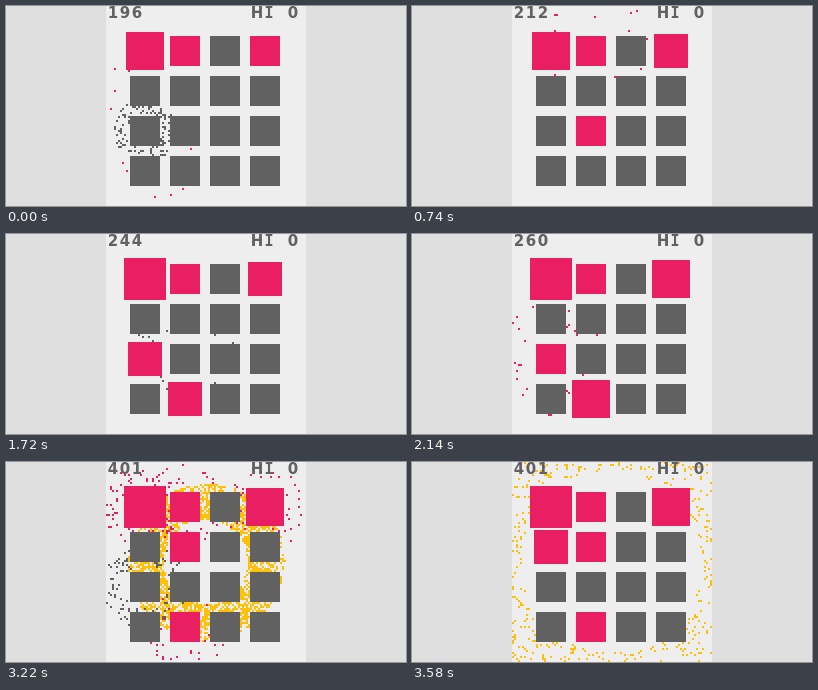
Recreate the animation shown at these times as an HTML page with a canvas. Size 400 by 200 pixels, loop 3.6 s.

```html
<!DOCTYPE html>
<html lang="en">
<head>
<meta charset="utf-8">
<title>Grid game</title>
<style>
  html, body { margin: 0; width: 100%; height: 100%; overflow: hidden; background: #dfdfdf; }
  canvas { display: block; filter: blur(0.6px); }
</style>
</head>
<body>
<canvas id="stage" width="400" height="200"></canvas>
<script>
const ctx = document.getElementById('stage').getContext('2d');
const LOOP = 3600;
const RED = '#e91e63', GREY = '#616161', GOLD = '#ffc107';
const cellX = col => 139 + col * 40;
const cellY = row => 45 + row * 40;

let seed = 7;
function random() {
  seed = (seed * 1664525 + 1013904223) >>> 0;
  return seed / 4294967296;
}

// Particles fly out in a ring, slow down and vanish one by one.
function burst(start, x, y, color, count, reach, life) {
  const dots = Array.from({ length: count }, () => {
    const angle = random() * Math.PI * 2;
    const speed = reach * (0.54 + 0.46 * random());
    return { vx: Math.cos(angle) * speed, vy: Math.sin(angle) * speed, end: life(random()) };
  });
  return { start, x, y, color, dots };
}

const pop = (start, col, row, color, count = 85) =>
  burst(start, cellX(col), cellY(row), color, count, 180, u => 230 + 330 * u * u);

const bursts = [
  burst(3000, 200, 100, GOLD, 3000, 333, u => 390 + 350 * u),
  pop(-416, 0, 2, RED, 70),
  pop(-160, 0, 2, GREY, 140),
  pop(390, 1, 0, RED),
  pop(1140, 1, 2, RED),
  pop(1430, 1, 2, GREY),
  pop(1830, 0, 2, RED),
  pop(2330, 1, 3, RED),
  pop(3000, 0, 0, RED, 70),
  pop(3000, 1, 0, RED, 45),
  pop(3000, 3, 0, RED, 45),
  pop(3000, 1, 3, RED, 45),
  pop(3000, 0, 2, GREY, 130)
];

// Cell changes: time, column, row, size, colour
const turns = [
  [0, 0, 0, 38, RED], [0, 1, 0, 30, RED], [0, 3, 0, 30, RED],
  [180, 1, 0, 34, RED], [390, 1, 0, 30, RED],
  [560, 3, 0, 34, RED], [560, 1, 2, 30, RED],
  [1280, 0, 2, 34, RED], [1280, 1, 3, 34, RED],
  [1430, 1, 2, 30, GREY], [1600, 0, 0, 42, RED],
  [1830, 0, 2, 30, RED],
  [2000, 3, 0, 38, RED], [2000, 1, 3, 38, RED],
  [2330, 1, 3, 34, RED],
  [2500, 0, 0, 46, RED], [2500, 2, 1, 30, GOLD],
  [3000, 0, 0, 42, RED], [3000, 1, 3, 30, RED],
  [3000, 0, 2, 30, GREY], [3000, 2, 1, 30, GREY],
  [3160, 1, 1, 30, RED], [3300, 0, 1, 34, RED]
];

const scores = [[0, 196], [390, 212], [1140, 228], [1430, 244], [1830, 260], [2330, 279], [3000, 401]];

function drawBurst(b, t) {
  const age = t - b.start;
  if (age < 0) return;
  const travel = 1 - Math.exp(-1.21 * age / 1000);
  const snap = v => Math.floor(v / 2) * 2;
  ctx.fillStyle = b.color;
  for (const d of b.dots) {
    if (age < d.end) ctx.fillRect(snap(b.x + d.vx * travel), snap(b.y + d.vy * travel), 2, 2);
  }
}

function drawCells(t) {
  const cells = Array.from({ length: 16 }, () => ({ size: 30, color: GREY }));
  for (const [time, col, row, size, color] of turns) {
    if (t >= time) cells[row * 4 + col] = { size, color };
  }
  cells.forEach(({ size, color }, i) => {
    ctx.fillStyle = color;
    ctx.fillRect(cellX(i % 4) - size / 2, cellY(i >> 2) - size / 2, size, size);
  });
}

// Text sits on a 12 px character grid; the mono face gives the I its serifs.
function drawText(text, x) {
  ctx.fillStyle = GREY;
  ctx.textAlign = 'center';
  [...text].forEach((ch, i) => {
    const family = ch === 'I' ? '"DejaVu Sans Mono", monospace' : '"DejaVu Sans", sans-serif';
    ctx.font = 'bold 15px ' + family;
    ctx.fillText(ch, x + i * 12, 12);
  });
}

function draw(now) {
  const t = now % LOOP;
  ctx.fillStyle = '#dfdfdf';
  ctx.fillRect(0, 0, 400, 200);
  ctx.save();
  ctx.beginPath();
  ctx.rect(100, 0, 200, 200);
  ctx.clip();
  ctx.fillStyle = '#eeeeee';
  ctx.fillRect(100, 0, 200, 200);
  bursts.forEach(b => drawBurst(b, t));
  drawCells(t);
  drawText(String(scores.filter(s => s[0] <= t).pop()[1]), 107);
  drawText('HI 0', 251);
  ctx.restore();
}

const begin = performance.now();
function tick() {
  draw(performance.now() - begin);
  requestAnimationFrame(tick);
}
tick();
</script>
</body>
</html>
```
